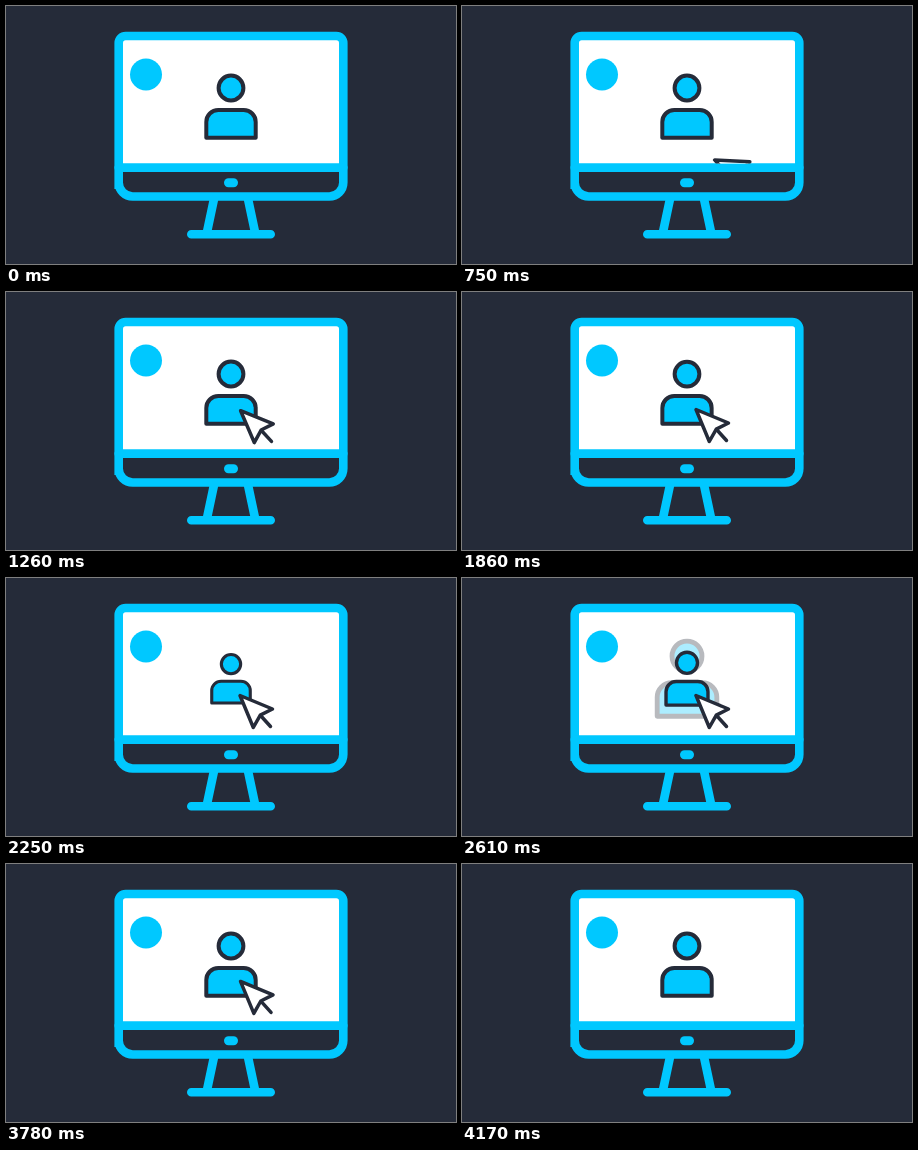
Animation, 450 px wide and 258 px high, one loop 4680 ms. Source, as an HTML page:

```html
<!DOCTYPE html>
<html lang="en">
<head>
<meta charset="utf-8">
<title>Monitor click</title>
<style>
  html, body { margin: 0; width: 100%; height: 100%; overflow: hidden; background: #252b39; }
  svg { display: block; width: 100vw; height: 100vh; }
  .line { fill: none; stroke: #00c8ff; stroke-width: 8.6; stroke-linecap: round; }
  .user { fill: #00c8ff; stroke: #252b39; stroke-width: 4; stroke-linejoin: round; }
  .arrow { fill: #fff; stroke: #252b39; stroke-width: 3.5; stroke-linecap: round; stroke-linejoin: round; }
</style>
</head>
<body>
<svg viewBox="0 0 450 258">
  <defs>
    <clipPath id="screen"><rect x="117" y="34" width="216" height="123.5"/></clipPath>
    <g id="person" class="user">
      <circle cx="225" cy="82" r="12.4"/>
      <path d="M200.3 131.8V116a12 12 0 0 1 12-12h25.4a12 12 0 0 1 12 12v15.8z"/>
    </g>
  </defs>

  <rect x="114" y="31" width="222" height="130" rx="5" fill="#fff"/>
  <path class="line" d="M112.7 183V37a7 7 0 0 1 7-7h210.600a7 7 0 0 1 7 7v139.500a14 14 0 0 1-14 14H126.700a14 14 0 0 1-14-14z"/>
  <path class="line" d="M112.7 161.600H337.300M208 193l-7 33M242 193l7 33M185.300 228.300h79.400"/>
  <rect x="218" y="172.300" width="14" height="9" rx="4.500" fill="#00c8ff"/>
  <circle cx="140" cy="68.500" r="16" fill="#00c8ff"/>

  <g clip-path="url(#screen)">
    <use id="ghost" href="#person"/>
    <use id="user" href="#person"/>
    <g id="cursor" class="arrow">
      <path d="M21 20.500l9.500 10.500"/>
      <path d="M0 0L32.500 13.500 20.300 19.600 13.300 32z"/>
    </g>
  </g>
</svg>
<script>
  const LOOP = 4680, STEP = 30;
  const REST = { x: 234, y: 117.5 };
  const PRESSED = 0.76;
  const [ghost, user, cursor] = ["ghost", "user", "cursor"].map(id => document.getElementById(id));

  const span = (t, from, to) => Math.min(1, Math.max(0, (t - from) / (to - from)));
  const mix = (a, b, k) => a + (b - a) * k;
  const easeIn = (k, p) => k ** p;
  const easeOut = (k, p) => 1 - (1 - k) ** p;
  const easeInOut = k => k * k * (3 - 2 * k);
  const show = (el, on) => el.setAttribute("visibility", on ? "visible" : "hidden");

  // Scales about the middle of the person.
  function scale(el, s) {
    el.setAttribute("transform", `translate(225 100.7) scale(${s}) translate(-225 -100.7)`);
  }

  function drawCursor(t) {
    const away = 1 - easeOut(span(t, 720, 1500), 3);
    const exit = easeIn(span(t, 3750, 4170), 2);
    const x = REST.x + 21 * away + 102 * exit;
    const y = REST.y + 41 * away - 18.5 * exit;
    cursor.setAttribute("transform", `translate(${x} ${y}) rotate(${-22 * away})`);
    show(cursor, t >= 750 && t < 4170);
  }

  function drawPerson(t) {
    const release = span(t, 2340, 2850);
    const s = t <= 2340
      ? mix(1, PRESSED, easeInOut(span(t, 1830, 2340)))
      : mix(PRESSED, 1, easeIn(release, 1.55));
    scale(user, s);

    const spread = easeOut(release, 1.5);
    scale(ghost, mix(PRESSED, 1.42, spread));
    ghost.setAttribute("opacity", 1 - spread);
    show(ghost, release > 0 && release < 1);
  }

  const start = performance.now();
  function frame() {
    const now = (performance.now() - start) % LOOP;
    const t = now - now % STEP;
    drawCursor(t);
    drawPerson(t);
    requestAnimationFrame(frame);
  }
  frame();
</script>
</body>
</html>
```
